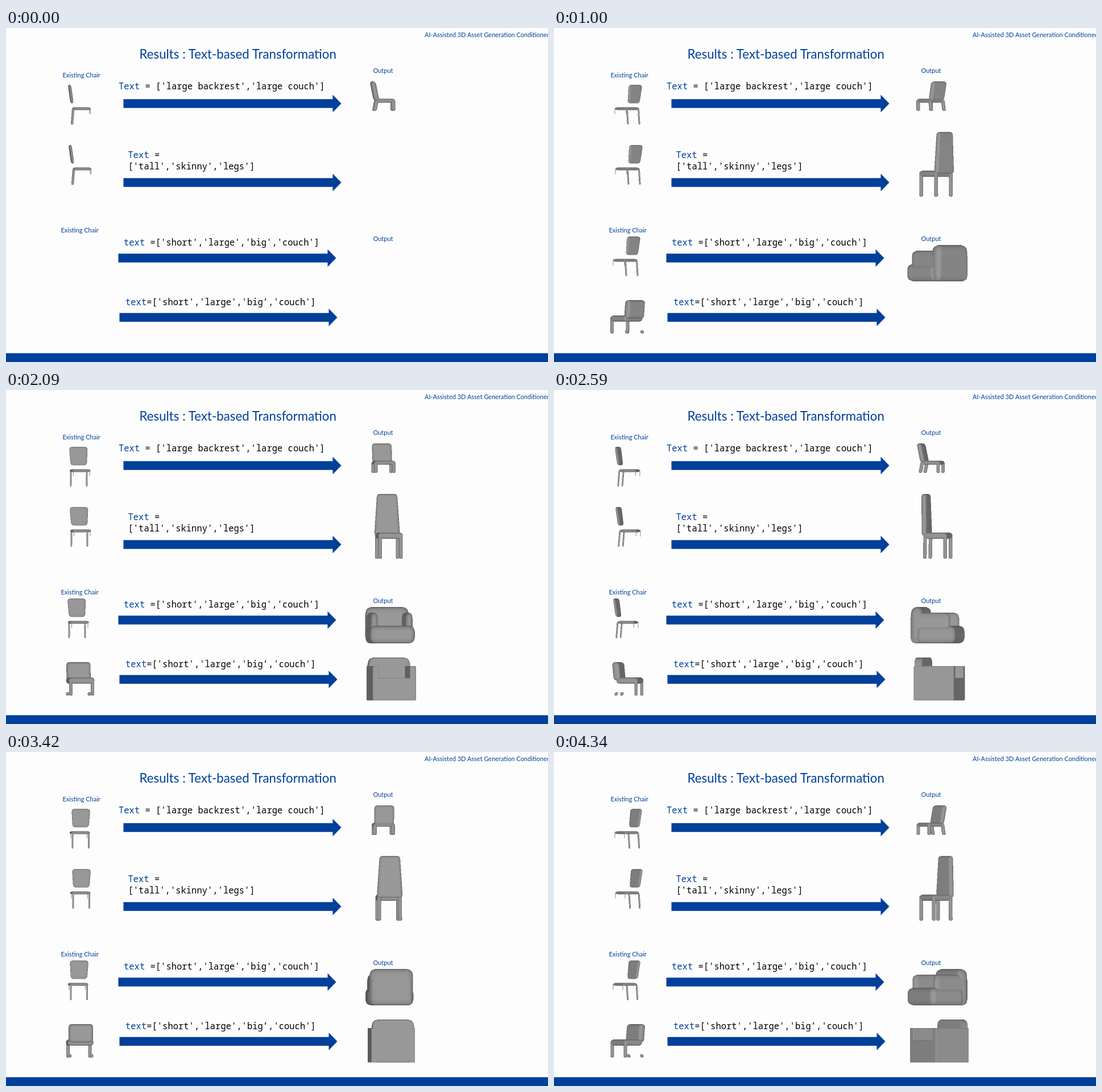
An HTML page with a canvas for the animation above (4.39 s loop, 953 px wide and 588 px high).

```html
<!DOCTYPE html>
<html lang="en">
<head>
<meta charset="utf-8">
<title>Text-based Transformation</title>
<style>
  html, body { margin: 0; width: 100%; height: 100%; overflow: hidden; background: #fdfdfd; }
  svg, canvas { position: absolute; left: 0; top: 0; width: 953px; height: 588px; }
  .label { font: 11px Lato, "Open Sans", sans-serif; fill: #00409a; }
  .title { font-size: 22.3px; }
  .code { font: 15.5px "Noto Sans Mono", "DejaVu Sans Mono", monospace; fill: #000; white-space: pre; }
  .code tspan, .blue { fill: #00409a; }
</style>
</head>
<body>
<svg viewBox="0 0 953 588">
  <defs>
    <path id="arrow" class="blue" d="M0-7.700H368V-15.500L383 0L368 15.500V7.700H0Z"/>
  </defs>
  <rect class="blue" y="572.5" width="953" height="16"/>
  <text class="label" x="736" y="16">AI-Assisted 3D Asset Generation Conditioned</text>
  <text class="label title" x="234.500" y="54">Results : Text-based Transformation</text>
  <text class="label" x="99.5" y="87">Existing Chair</text>
  <text class="label" x="645.5" y="79">Output</text>
  <text class="label" x="96.5" y="360">Existing Chair</text>
  <text class="label" x="645.5" y="375">Output</text>
  <use href="#arrow" x="206.5" y="133"/>
  <use href="#arrow" x="206.5" y="272"/>
  <use href="#arrow" x="197.5" y="405"/>
  <use href="#arrow" x="199.5" y="509.5"/>
  <text class="code" x="198" y="108"><tspan>Text</tspan> = ['large backrest','large couch']</text>
  <text class="code" x="214.5" y="229"><tspan>Text</tspan> =</text>
  <text class="code" x="214.5" y="249">['tall','skinny','legs']</text>
  <text class="code" x="207" y="383"><tspan>text</tspan> =['short','large','big','couch']</text>
  <text class="code" x="210" y="488"><tspan>text</tspan>=['short','large','big’,'couch']</text>
</svg>
<canvas id="stage" width="953" height="588"></canvas>
<svg id="cursor" viewBox="0 0 953 588" visibility="hidden">
  <path d="M489.5 404v10.500l2.300-2.100 1.800 3.800 1.500-.7-1.700-3.700h3.200z" fill="#fff" stroke="#223" stroke-width=".8"/>
</svg>
<script>
const LOOP = 4390, STEP = 41.73, LAST = 104;
const SS = 2, W = 130 * SS, H = 124 * SS;

// Rounded box: u runs forward, y down, w sideways. r holds the corner radii.
function block([u0, u1], [y0, y1], [w0, w1], r, lean = 0, taper = 0) {
  const mid = [(u0 + u1) / 2, (y0 + y1) / 2, (w0 + w1) / 2];
  const half = [(u1 - u0) / 2, (y1 - y0) / 2, (w1 - w0) / 2];
  const rad = half.map((h, i) => Math.min(h, r[i] ?? r[0]));
  const ticks = half.map((h, i) => {
    const a = h - rad[i], b = h - 0.4 * rad[i];
    return [-h, -b, -a, a, b, h];
  });
  const vertex = p => {
    const core = p.map((v, i) => Math.max(rad[i] - half[i], Math.min(half[i] - rad[i], v)));
    const d = p.map((v, i) => (v - core[i]) / rad[i]);
    const len = Math.hypot(...d) || 1;
    const [u, y, w] = core.map((v, i) => v + d[i] / len * rad[i]);
    const n = d.map((v, i) => v / rad[i]);
    const nl = Math.hypot(...n) || 1;
    const k = y / half[1];
    return { u: mid[0] + u + lean * k, y: mid[1] + y, w: (mid[2] + w) * (1 + taper * k),
             nu: n[0] / nl, nw: n[2] / nl };
  };
  const quads = [];
  for (let axis = 0; axis < 3; axis++) {
    const b = (axis + 1) % 3, c = (axis + 2) % 3;
    for (const side of [-1, 1]) {
      const at = (i, j) => {
        const p = [];
        p[axis] = side * half[axis];
        p[b] = ticks[b][i];
        p[c] = ticks[c][j];
        return vertex(p);
      };
      for (let i = 0; i < 5; i++)
        for (let j = 0; j < 5; j++)
          quads.push([at(i, j), at(i + 1, j), at(i + 1, j + 1), at(i, j + 1)]);
    }
  }
  return quads;
}

const mirror = make => [-1, 1].flatMap(make);

// Sizes in pixels; seat, backEnd, rearFrom and frontTo are heights measured from the top.
function chair({ width, depth, height, seat, thick, back, leg, lean = 0, taper = 0,
                 backEnd = seat + thick / 2, rearFrom = seat + 2, frontTo = height, frontLeg = leg }) {
  const w = width / 2, d = depth / 2, legW = 0.84 * w;
  const post = (u, y0, y1, r, tilt) => mirror(s =>
    block([u - r, u + r], [y0, y1], [s * legW - r, s * legW + r], [r, 2, r], tilt));
  return [
    block([-d, back - d], [0, backEnd], [1.5 - w, w - 1.5], [back / 2, 5, 5], lean, taper),
    block([-0.7 * d, d], [seat, seat + thick], [-w, w], [5, thick / 2, 5]),
    post(-0.7 * d, rearFrom, height, leg, -lean / 2),
    post(d - frontLeg, seat + 2, frontTo, frontLeg)
  ].flat();
}

function sofa({ width, depth, height, seat, back, armTop, arm, round, bulge = 0 }) {
  const w = width / 2, d = depth / 2, armW = w - bulge / 4;
  return [
    block([-d, back - d], [0, height], [1.5 - w, w - 1.5], [round, 12, 11]),
    block([-0.75 * d, d], [seat, height], [-w, w], [round]),
    mirror(s => block([-d, d - bulge], [armTop, height],
      [s * armW, s * (armW - arm)].sort((a, b) => a - b), [round, round, Math.min(round, arm / 2)]))
  ].flat();
}

const slim = chair({ width: 34, depth: 37, height: 70, seat: 39.5, thick: 5, back: 4.6, backEnd: 32.5,
                     leg: 1.5, lean: 2.3, taper: -0.07, frontTo: 52, frontLeg: 0.5 });
const small = chair({ width: 38, depth: 40, height: 52, seat: 30.5, thick: 7, back: 9, leg: 3.2, lean: 3.5 });
const tall = chair({ width: 44, depth: 47, height: 114, seat: 68, thick: 11, back: 9.5, leg: 3.3,
                     lean: 0.8, taper: 0.12 });
const low = chair({ width: 46, depth: 46, height: 59, seat: 27, thick: 11, back: 13, leg: 3,
                    lean: 1.5, rearFrom: 53 });
const soft = sofa({ width: 80, depth: 82, height: 64, seat: 33, back: 22, armTop: 10, arm: 13,
                    round: 10, bulge: 10 });
const boxy = sofa({ width: 77, depth: 73, height: 75.5, seat: 36, back: 15, armTop: 15, arm: 11, round: 1.5 });

// Mesh, rotation axis x, top y; in order of appearance.
const objects = [
  [slim, 130, 100], [slim, 131, 206], [small, 663.5, 94], [tall, 673, 183],
  [slim, 127, 367], [low, 130, 479], [soft, 674.5, 382], [boxy, 677.5, 471]
];
const appears = i => Math.max(0, i - 2) * 230;
const angleAt = t => (3 + 0.1322 * t) * Math.PI / 180;

const ctx = document.getElementById("stage").getContext("2d");
const cursor = document.getElementById("cursor");
const tile = document.createElement("canvas");
tile.width = W;
tile.height = H;
const tileCtx = tile.getContext("2d");
const image = tileCtx.createImageData(W, H);
const depthMap = new Float32Array(W * H);

function triangle(a, b, c) {
  const area = (b.x - a.x) * (c.y - a.y) - (b.y - a.y) * (c.x - a.x);
  if (Math.abs(area) < 1e-6) return;
  const x0 = Math.max(0, Math.floor(Math.min(a.x, b.x, c.x)));
  const x1 = Math.min(W - 1, Math.ceil(Math.max(a.x, b.x, c.x)));
  const y0 = Math.max(0, Math.floor(Math.min(a.y, b.y, c.y)));
  const y1 = Math.min(H - 1, Math.ceil(Math.max(a.y, b.y, c.y)));
  for (let y = y0; y <= y1; y++) {
    for (let x = x0; x <= x1; x++) {
      const px = x + 0.5 - a.x, py = y + 0.5 - a.y;
      const v = (px * (c.y - a.y) - py * (c.x - a.x)) / area;
      const w = (py * (b.x - a.x) - px * (b.y - a.y)) / area;
      const u = 1 - v - w;
      if (u < 0 || v < 0 || w < 0) continue;
      const z = u * a.z + v * b.z + w * c.z, i = y * W + x;
      if (z <= depthMap[i]) continue;
      depthMap[i] = z;
      const lum = 84 + 69 * Math.max(0, u * a.light + v * b.light + w * c.light);
      image.data.fill(lum, i * 4, i * 4 + 3);
      image.data[i * 4 + 3] = 255;
    }
  }
}

function drawObject(mesh, x, y, angle) {
  const cos = Math.cos(angle), sin = Math.sin(angle);
  const project = p => ({
    x: W / 2 + (p.u * cos + p.w * sin) * SS,
    y: (p.y + 2) * SS,
    z: p.w * cos - p.u * sin,
    light: p.nw * cos - p.nu * sin
  });
  depthMap.fill(-1e4);
  image.data.fill(0);
  for (const quad of mesh) {
    const [a, b, c, d] = quad.map(project);
    if (Math.max(a.light, b.light, c.light, d.light) < -0.1) continue;
    triangle(a, b, c);
    triangle(a, c, d);
  }
  tileCtx.putImageData(image, 0, 0);
  ctx.drawImage(tile, x - W / SS / 2, y - 2, W / SS, H / SS);
}

const start = performance.now();
let shown = -1;
function tick() {
  const now = (performance.now() - start) % LOOP;
  const step = Math.min(LAST, Math.floor((now + 3) / STEP));
  if (step !== shown) {
    shown = step;
    const t = step * STEP;
    ctx.clearRect(0, 0, 953, 588);
    objects.forEach(([mesh, x, y], i) => {
      if (t >= appears(i)) drawObject(mesh, x, y, angleAt(t));
    });
    cursor.setAttribute("visibility", t > 1280 && t < 1500 ? "visible" : "hidden");
  }
  requestAnimationFrame(tick);
}
tick();
</script>
</body>
</html>
```
